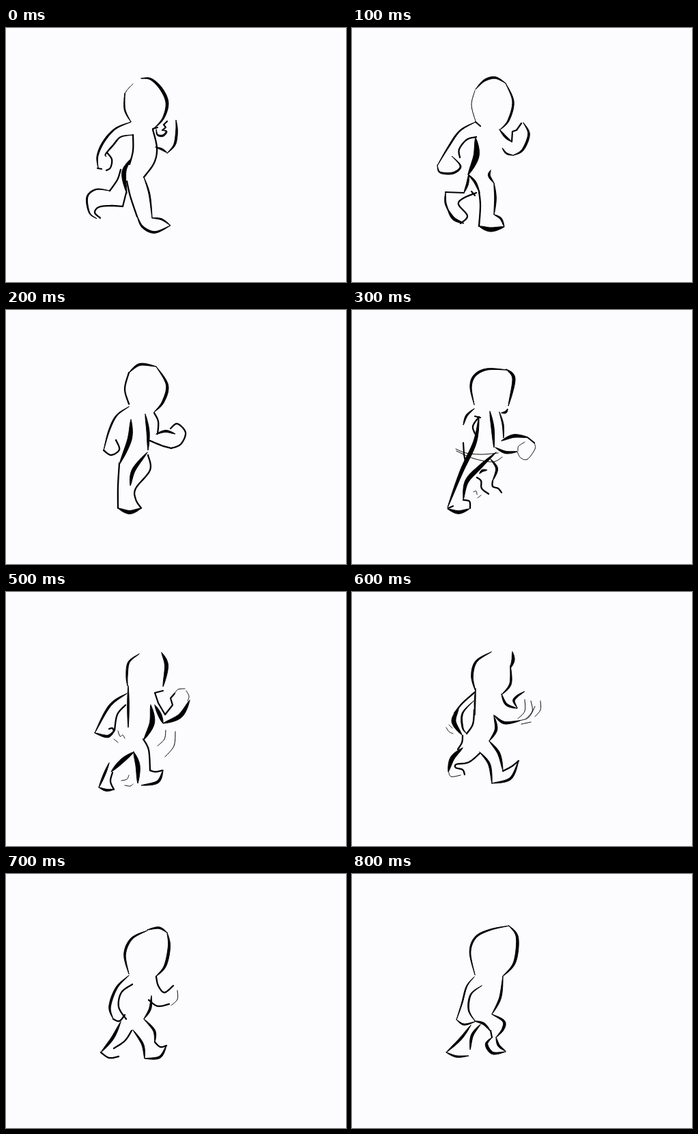
An HTML page that plays this animation: 498 by 373 pixels, repeating every 1 s.

```html
<!DOCTYPE html>
<html lang="en">
<head>
<meta charset="utf-8">
<title>Walk cycle</title>
<style>
  html, body { margin: 0; width: 100%; height: 100%; overflow: hidden; background: #fcfbfd; }
  svg { display: block; width: 498px; height: 373px; }
  g { visibility: hidden; animation: short 1s step-end infinite; }
  .hold { animation-name: long; }
  @keyframes short { 0% { visibility: visible; } 10%, 100% { visibility: hidden; } }
  @keyframes long { 0% { visibility: visible; } 20%, 100% { visibility: hidden; } }
</style>
</head>
<body>
<svg viewBox="0 0 498 373"></svg>
<script>
const NS = 'http://www.w3.org/2000/svg';
const svg = document.querySelector('svg');
let group;

function add(d, fill, width) {
  const path = document.createElementNS(NS, 'path');
  const look = { d, fill, stroke: '#000', 'stroke-width': width, 'stroke-linecap': 'round', 'stroke-linejoin': 'round' };
  for (const key in look) path.setAttribute(key, look[key]);
  group.append(path);
}

const pairs = list => list.flatMap((x, i) => i % 2 ? [] : [[x, list[i + 1]]]);
const toPath = pts => 'M' + pts.map(p => p.map(v => v.toFixed(2)).join(' ')).join('L');

// Catmull-Rom curve through all points
function curve(pts, steps = 10) {
  const get = i => pts[Math.max(0, Math.min(pts.length - 1, i))];
  const out = [];
  for (let i = 0; i < pts.length - 1; i++) {
    const [a, b, c, d] = [-1, 0, 1, 2].map(k => get(i + k));
    for (let s = 0; s < steps; s++) {
      const t = s / steps;
      out.push([0, 1].map(n => b[n] + t / 2 * (c[n] - a[n]
        + t * (2 * a[n] - 5 * b[n] + 4 * c[n] - d[n] + t * (3 * b[n] - a[n] - 3 * c[n] + d[n])))));
    }
  }
  return [...out, get(pts.length)];
}

// Brush stroke: thin ends, widest halfway
function ink(width, ...list) {
  const pts = curve(pairs(list)), last = pts.length - 1;
  const side = sign => pts.map(([x, y], i) => {
    const [ax, ay] = pts[Math.max(0, i - 1)], [bx, by] = pts[Math.min(last, i + 1)];
    const r = sign * (width - 1) / 2 * Math.sin(Math.PI * i / last) / (Math.hypot(bx - ax, by - ay) || 1);
    return [x - (by - ay) * r, y + (bx - ax) * r];
  });
  add(toPath([...side(1), ...side(-1).reverse()]) + 'Z', '#000', 1);
}
const pen = (...list) => add(toPath(curve(pairs(list))), 'none', 2.3);
const line = (...list) => add(toPath(pairs(list)), 'none', 2.2);
const hair = (...list) => add(toPath(curve(pairs(list))), 'none', 1);

function pose(start, length, draw) {
  group = document.createElementNS(NS, 'g');
  if (length > 100) group.classList.add('hold');
  group.style.animationDelay = start - 1000 + 'ms';
  draw();
  svg.append(group);
}

pose(0, 100, () => {
  hair(186, 82, 176, 93, 173, 104);
  ink(2.6, 174, 96, 174, 120, 183, 138);
  ink(5, 198, 74, 212, 75, 227, 89, 236, 110, 230, 133, 215, 149);
  ink(3.6, 183, 138, 160, 148, 143, 167, 134, 188, 135, 206);
  line(134, 206, 140, 207);
  ink(2.8, 186, 157, 168, 160, 157, 172, 146, 185, 147, 189);
  pen(148, 183, 155, 193, 153, 205, 147, 209);
  pen(186, 157, 186, 180, 181, 200);
  ink(7, 184, 191, 174, 207, 173, 222, 177, 243);
  pen(177, 225, 182, 247, 192, 277);
  pen(215, 149, 221, 176, 217, 198, 202, 219);
  ink(2.8, 202, 219, 210, 244, 214, 279);
  ink(4, 192, 276, 200, 292, 218, 300, 241, 290);
  ink(3, 214, 279, 228, 281, 241, 290);
  ink(3.5, 220, 149, 222, 157, 230, 158, 235, 152, 229, 150);
  line(229, 150, 234, 146, 231, 142, 236, 137);
  line(215, 148, 222, 146);
  ink(3.5, 219, 175, 228, 178, 236, 183);
  ink(4, 236, 184, 247, 171, 250, 151, 249, 135);
  pen(168, 208, 163, 223, 152, 239);
  ink(3, 152, 239, 132, 237, 119, 248, 122, 271, 133, 280);
  pen(138, 279, 130, 271, 136, 263, 153, 261, 171, 262);
  line(171, 262, 176, 242);
});

pose(100, 100, () => {
  hair(180, 92, 175, 113, 181, 137);
  ink(4, 181, 90, 194, 77, 210, 73, 225, 81);
  ink(3.5, 225, 81, 236, 108, 229, 136, 216, 150);
  ink(3, 181, 138, 158, 151, 141, 175, 125, 202);
  ink(3.6, 125, 202, 129, 212, 148, 213, 159, 203, 146, 188);
  pen(182, 160, 168, 164, 157, 178, 158, 190);
  line(181, 138, 188, 144);
  ink(9, 181, 161, 182, 188, 170, 216);
  ink(4, 171, 215, 169, 229, 164, 242);
  line(164, 242, 137, 241);
  ink(3, 137, 241, 137, 257, 143, 272);
  ink(5, 140, 266, 149, 280, 164, 287);
  pen(159, 287, 169, 276, 156, 259, 163, 250, 182, 242);
  line(175, 240, 180, 246);
  ink(4, 170, 215, 180, 226, 187, 242);
  pen(186, 240, 188, 261, 186, 291);
  ink(4, 203, 209, 201, 217, 208, 228);
  ink(3.6, 208, 228, 210, 250, 208, 274);
  ink(3.5, 208, 274, 218, 280, 223, 292);
  ink(7, 186, 291, 203, 296, 223, 292);
  ink(4, 216, 149, 225, 160, 234, 167);
  line(234, 167, 235, 152, 241, 150, 248, 140);
  ink(4, 251, 139, 259, 156, 250, 179, 236, 187);
  ink(3, 236, 187, 226, 184, 220, 176);
});

pose(200, 100, () => {
  pen(180, 138, 174, 116, 180, 92);
  ink(4, 180, 92, 196, 80, 220, 83);
  ink(4.5, 220, 83, 236, 110, 230, 135, 217, 150);
  ink(3, 180, 142, 162, 155, 151, 177, 143, 206);
  pen(143, 206, 154, 213, 166, 205, 161, 191);
  ink(7, 183, 161, 181, 190, 166, 227);
  pen(166, 225, 164, 259, 164, 291);
  ink(5, 204, 153, 208, 179, 208, 206);
  pen(217, 151, 223, 164, 222, 182);
  ink(6, 207, 209, 187, 235, 182, 258);
  pen(208, 213, 211, 235, 190, 262, 190, 278, 198, 291);
  ink(6, 164, 291, 181, 297, 198, 291);
  ink(4, 220, 182, 234, 178, 248, 182);
  pen(211, 192, 228, 199, 242, 203);
  pen(242, 203, 256, 197, 263, 180, 251, 167, 241, 174);
});

pose(300, 200, () => {
  ink(4.2, 179, 139, 174, 113, 180, 96, 198, 87, 227, 88);
  ink(5, 226, 87, 237, 101, 229, 141);
  ink(3.5, 179, 145, 168, 155, 163, 169);
  pen(186, 157, 177, 171, 182, 185);
  line(180, 156, 188, 158);
  ink(6.5, 186, 157, 180, 194, 160, 238, 140, 290);
  ink(5, 202, 149, 206, 173, 208, 202);
  ink(3, 216, 150, 221, 168, 222, 188);
  ink(5.5, 219, 192, 237, 185, 258, 187);
  ink(4.5, 210, 202, 225, 209, 242, 208);
  hair(242, 208, 247, 217, 257, 219, 268, 204, 267, 195);
  line(257, 187, 267, 195);
  hair(243, 207, 244, 200, 253, 194);
  hair(152, 204, 167, 210, 190, 212, 214, 210);
  hair(153, 207, 178, 218, 206, 223, 220, 216);
  line(163, 195, 164, 212, 167, 227);
  ink(7, 211, 209, 188, 230, 168, 252, 163, 279);
  ink(5.5, 140, 292, 156, 297, 172, 292);
  pen(163, 279, 172, 281, 173, 291);
  line(141, 291, 148, 288);
  ink(4, 203, 219, 212, 233, 206, 251);
  pen(206, 251, 206, 259, 214, 262, 219, 268);
  ink(4, 187, 240, 191, 236, 198, 235);
  pen(183, 246, 189, 251, 190, 262, 200, 270);
  ink(4, 219, 151, 225, 150, 228, 145);
  hair(178, 267, 182, 266, 183, 271);
  hair(184, 276, 189, 272);
});

pose(500, 100, () => {
  ink(3.6, 195, 91, 180, 103, 177, 123, 178, 138);
  ink(6, 228, 89, 235, 108, 230, 139);
  ink(3.6, 179, 138, 179, 168, 179, 199);
  ink(4, 177, 149, 152, 167, 130, 207);
  ink(4.5, 130, 207, 149, 212, 159, 203);
  pen(175, 166, 163, 180, 159, 203);
  pen(158, 205, 156, 200, 151, 201);
  line(230, 145, 218, 148, 223, 163, 233, 180, 244, 166, 241, 156, 247, 149);
  ink(6, 218, 166, 225, 180, 230, 193);
  hair(247, 149, 252, 143, 262, 142);
  hair(264, 145, 268, 153, 266, 160);
  ink(7, 269, 159, 255, 182, 230, 193);
  ink(8, 212, 166, 214, 192, 202, 217);
  pen(201, 216, 209, 232, 211, 262);
  pen(211, 262, 219, 264, 229, 262);
  ink(4.5, 230, 262, 222, 279, 198, 284);
  ink(7, 187, 235, 170, 248, 154, 264);
  ink(7, 187, 235, 193, 255, 193, 281);
  ink(4, 151, 251, 144, 268, 136, 287);
  ink(4, 136, 287, 147, 291, 158, 290);
  pen(158, 290, 153, 278, 156, 265);
  hair(164, 204, 167, 212, 171, 210, 174, 215);
  hair(158, 216, 164, 221);
  hair(234, 203, 232, 216, 222, 226);
  hair(248, 205, 246, 226, 233, 242);
  hair(169, 277, 177, 275, 180, 269);
  hair(174, 284, 182, 285, 186, 282);
});

pose(600, 100, () => {
  ink(4, 204, 88, 182, 102, 176, 124, 181, 146);
  ink(5, 235, 88, 236, 100, 232, 112);
  ink(3.6, 232, 108, 232, 135, 219, 151);
  ink(2.8, 181, 142, 180, 162, 180, 181);
  pen(180, 147, 162, 163, 150, 178);
  ink(7, 156, 171, 149, 190, 161, 210);
  ink(3, 178, 160, 162, 178, 162, 199, 168, 208);
  pen(168, 208, 177, 194, 179, 173);
  pen(162, 211, 161, 221, 155, 231);
  ink(7, 162, 229, 147, 244, 141, 264);
  pen(165, 268, 162, 261, 152, 258, 153, 253, 171, 250, 187, 237);
  ink(4, 187, 235, 201, 253, 205, 281);
  ink(4.5, 201, 219, 215, 237, 221, 262);
  ink(4.5, 208, 182, 211, 202, 201, 219);
  ink(4, 205, 281, 232, 274, 244, 248);
  pen(244, 248, 234, 256, 221, 263);
  ink(4.5, 208, 181, 223, 192, 246, 189);
  ink(4, 219, 150, 226, 165, 242, 171);
  ink(4, 242, 170, 237, 160, 242, 153, 253, 146);
  hair(253, 158, 253, 175, 243, 186);
  hair(262, 160, 264, 175, 254, 187);
  hair(245, 189, 259, 184, 268, 168);
  hair(276, 160, 276, 173, 268, 183);
  hair(248, 194, 262, 191);
  hair(138, 199, 142, 205, 148, 208);
  hair(142, 195, 147, 200);
  hair(141, 262, 145, 271, 159, 269);
});

pose(700, 100, () => {
  ink(4, 207, 83, 184, 95, 174, 118, 180, 147);
  ink(3.5, 207, 82, 224, 79, 236, 86);
  ink(4.5, 236, 86, 239, 106, 233, 135, 219, 151);
  ink(4, 180, 149, 162, 167, 152, 195, 157, 213);
  pen(157, 213, 166, 216, 174, 207);
  pen(185, 162, 169, 174, 165, 195, 176, 213);
  pen(220, 151, 223, 164, 232, 174, 245, 164);
  ink(4, 213, 179, 211, 198, 202, 213);
  pen(209, 185, 222, 194, 239, 191);
  ink(4, 202, 213, 217, 230, 218, 247);
  pen(218, 247, 226, 254, 235, 252);
  ink(4, 235, 252, 225, 269, 203, 271);
  ink(4, 186, 229, 200, 250, 203, 271);
  ink(5, 168, 217, 156, 241, 139, 262);
  pen(139, 262, 151, 270, 165, 268);
  pen(184, 230, 174, 245, 158, 256);
  hair(251, 171, 251, 184, 242, 193);
});

pose(800, 200, () => {
  ink(3.4, 180, 148, 173, 115, 181, 93, 202, 82, 230, 76);
  ink(4.6, 230, 76, 242, 93, 238, 130, 220, 151);
  ink(2.6, 179, 151, 168, 165, 161, 190, 153, 214);
  ink(3, 153, 214, 164, 221, 180, 217);
  ink(2.8, 190, 164, 174, 177, 171, 200, 181, 217);
  ink(3.8, 221, 151, 217, 182, 205, 206);
  ink(4.6, 205, 206, 222, 216, 221, 228, 211, 240);
  ink(4, 211, 240, 215, 252, 225, 260);
  ink(5, 225, 261, 206, 263, 197, 250, 205, 240);
  ink(4, 180, 216, 193, 220, 203, 231);
  line(203, 230, 205, 240);
  ink(4.4, 174, 222, 159, 242, 138, 262);
  ink(3.4, 138, 262, 153, 268, 171, 267);
  ink(4.4, 188, 221, 176, 237, 173, 258);
});
</script>
</body>
</html>
```
